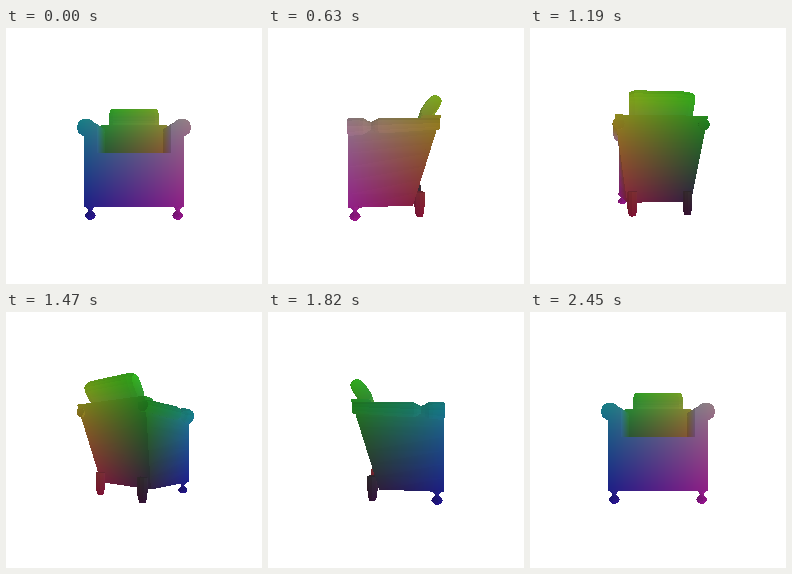
An HTML page with a canvas that plays this animation: 256 by 256 pixels, repeating every 2520 ms.

```html
<!DOCTYPE html>
<html lang="en">
<head>
<meta charset="utf-8">
<title>Turning armchair</title>
<style>
html, body { margin: 0; width: 100%; height: 100%; overflow: hidden; background: #fff; }
canvas { display: block; width: 100%; height: 100%; }
</style>
</head>
<body>
<canvas id="stage" width="256" height="256"></canvas>
<script>
const SIZE = 256, MID = 128, CAMERA = 232;
const STEP_MS = 70, STEPS = 36;
const FLOOR = -43, SEAT = 2.5, FRONT = 37.5, HALF_WIDTH = 42;
const ctx = document.getElementById('stage').getContext('2d');
const image = ctx.createImageData(SIZE, SIZE);
const pixels = new Uint32Array(image.data.buffer);
const depths = new Float32Array(SIZE * SIZE);
const triangles = [];

const mix = (a, b, t) => a + (b - a) * t;

// Joins rings of equal length into a closed solid.
function loft(rings) {
  const n = rings[0].length;
  for (let r = 0; r + 1 < rings.length; r++) {
    for (let i = 0; i < n; i++) {
      const j = (i + 1) % n, a = rings[r], b = rings[r + 1];
      triangles.push([a[i], a[j], b[j]], [a[i], b[j], b[i]]);
    }
  }
  for (const ring of [rings[0], rings[rings.length - 1]]) {
    const centre = [0, 1, 2].map(k => ring.reduce((sum, p) => sum + p[k], 0) / n);
    ring.forEach((p, i) => triangles.push([centre, p, ring[(i + 1) % n]]));
  }
}

// Sweeps t from 0 to 1 and lofts the rings that section(t) returns.
const sweep = (count, section) =>
  loft(Array.from({ length: count + 1 }, (_, i) => section(i / count)));

const around = (n, place) => Array.from({ length: n }, (_, i) => {
  const a = i * 2 * Math.PI / n;
  return place(Math.cos(a), Math.sin(a));
});

// The chair narrows and tucks in towards the floor at the back.
const backX = y => 35 + 0.12 * y;
const backZ = y => -29 - 0.3 * y;

const slab = (y, x, front) =>
  [[-x, y, front], [x, y, front], [backX(y), y, backZ(y)], [-backX(y), y, backZ(y)]];

function buildArm(side) {
  sweep(3, t => {
    const y = mix(SEAT, 27, t);
    return [[31, FRONT], [HALF_WIDTH, FRONT], [backX(y), backZ(y)], [32, backZ(y)]]
      .map(([x, z]) => [side * x, y, z]);
  });
  // Rolled top with a notch behind the front scroll
  sweep(24, t => {
    const z = mix(FRONT, -38, t);
    const notch = 1 - 0.5 * Math.exp(-(((z - 19) / 4) ** 2));
    const radius = mix(7.8, 5, t) * notch;
    return around(10, (c, s) =>
      [side * (mix(40.3, 36, t) + radius * c), mix(24, 27, t) + radius * s, z]);
  });
}

function buildLegs(side) {
  sweep(8, t => {
    const radius = 3.3 + 1.6 * Math.cos(2 * Math.PI * t / 0.75);
    return around(8, (c, s) => [side * 37.5 + radius * c, mix(-42, -54, t), 33 + radius * s]);
  });
  sweep(4, t => {
    const radius = 4.5 - 1.5 * t ** 8;
    return around(8, (c, s) => [side * 25 + radius * c, mix(-32, -53.5, t), -22 + radius * s]);
  });
}

function buildHeadrest() {
  const square = v => Math.sign(v) * Math.abs(v) ** 0.7;
  const tilt = 0.65, cos = Math.cos(tilt), sin = Math.sin(tilt);
  sweep(12, t => {
    const across = 2 * t - 1, size = 1 - 0.15 * across ** 12;
    return around(16, (c, s) => {
      const up = 12.5 * size * square(c), out = 6.5 * size * square(s);
      return [27.5 * across, 43.5 + up * cos + out * sin, -32 - up * sin + out * cos];
    });
  });
}

function buildChair() {
  sweep(4, t => slab(mix(FLOOR, SEAT, t), HALF_WIDTH, FRONT));
  sweep(4, t => slab(mix(SEAT, 34, t), 36, -23));
  buildHeadrest();
  for (const side of [-1, 1]) {
    buildArm(side);
    buildLegs(side);
  }
}

// Colour follows position: red across, green up, blue towards the front.
const tint = ([x, y, z]) =>
  [92 + 1.45 * x, 87 + 1.25 * y + 0.01 * Math.max(0, y) ** 2, 88 + 1.45 * z];

function shadeOf([a, b, c]) {
  const u = b.map((v, k) => v - a[k]), v = c.map((w, k) => w - a[k]);
  const n = [u[1] * v[2] - u[2] * v[1], u[2] * v[0] - u[0] * v[2], u[0] * v[1] - u[1] * v[0]];
  const facing = -n[0] * a[0] - n[1] * a[1] + n[2] * (CAMERA - a[2]);
  const k = Math.sign(facing) / (Math.hypot(...n) || 1);
  return 0.9 + k * (0.1 * n[0] - 0.08 * n[1] + 0.04 * n[2]);
}

function fillTriangle(p, colours, shade) {
  const [a, b, c] = p;
  const area = (b.x - a.x) * (c.y - a.y) - (c.x - a.x) * (b.y - a.y);
  if (Math.abs(area) < 1e-6) return;
  const xs = p.map(q => q.x), ys = p.map(q => q.y);
  const right = Math.max(...xs), bottom = Math.max(...ys);
  for (let y = Math.floor(Math.min(...ys)); y <= bottom; y++) {
    for (let x = Math.floor(Math.min(...xs)); x <= right; x++) {
      const px = x + 0.5, py = y + 0.5;
      const wb = ((px - a.x) * (c.y - a.y) - (c.x - a.x) * (py - a.y)) / area;
      const wc = ((b.x - a.x) * (py - a.y) - (px - a.x) * (b.y - a.y)) / area;
      const wa = 1 - wb - wc;
      if (wa < 0 || wb < 0 || wc < 0) continue;
      const depth = wa * a.scale + wb * b.scale + wc * c.scale, i = y * SIZE + x;
      if (depth <= depths[i]) continue;
      depths[i] = depth;
      const channel = k => Math.max(0, Math.min(255,
        shade * (wa * colours[0][k] + wb * colours[1][k] + wc * colours[2][k])));
      pixels[i] = (255 << 24 | channel(2) << 16 | channel(1) << 8 | channel(0)) >>> 0;
    }
  }
}

function draw(angle) {
  const cos = Math.cos(angle), sin = Math.sin(angle);
  pixels.fill(0xffffffff);
  depths.fill(0);
  for (const { points, colours } of faces) {
    const turned = points.map(([x, y, z]) => [x * cos - z * sin, y, x * sin + z * cos]);
    const projected = turned.map(([x, y, z]) => {
      const scale = CAMERA / (CAMERA - z);
      return { x: MID + x * scale, y: MID - y * scale, scale };
    });
    fillTriangle(projected, colours, shadeOf(turned));
  }
  ctx.putImageData(image, 0, 0);
}

buildChair();
const faces = triangles.map(points => ({ points, colours: points.map(tint) }));

// The last pose repeats the first, so a full turn takes one step less.
let shown = -1;
function tick() {
  const step = Math.floor(performance.now() / STEP_MS) % STEPS;
  if (step !== shown) draw(step * 2 * Math.PI / (STEPS - 1));
  shown = step;
  requestAnimationFrame(tick);
}
tick();
</script>
</body>
</html>
```
